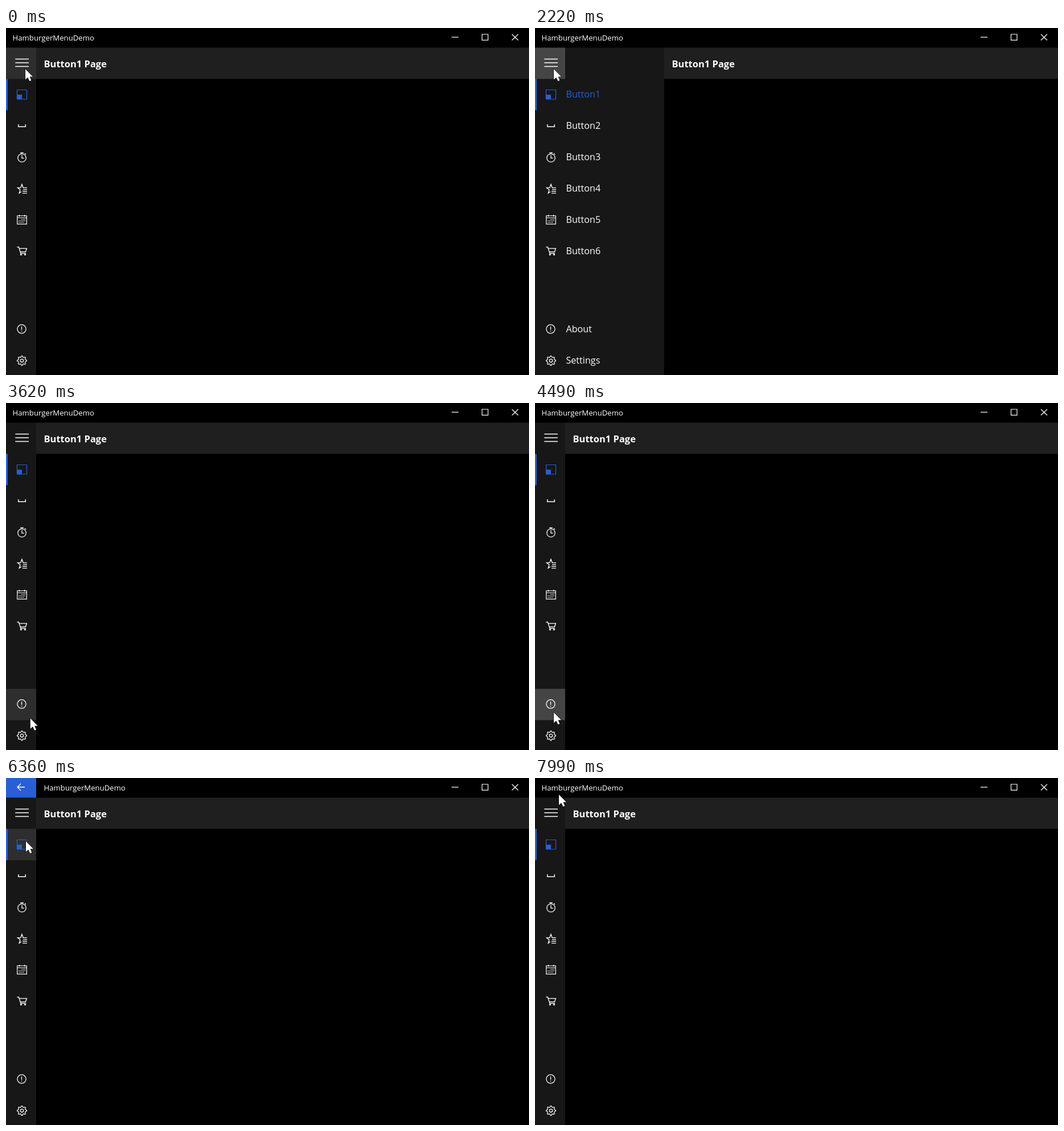
Write an HTML page with a canvas that moves like this. It is 919 by 609 pixels and loops after 8290 ms.

```html
<!DOCTYPE html>
<html lang="en">
<head>
<meta charset="utf-8">
<title>HamburgerMenuDemo</title>
<style>
  html, body { margin: 0; width: 100%; height: 100%; overflow: hidden; background: #000; }
  canvas { position: absolute; left: 0; top: 0; }
  span {
    position: absolute; color: #fff; white-space: pre;
    font: 16.2px/20px "Open Sans", "Noto Sans", sans-serif;
  }
  #title { top: 6.5px; font-size: 13.2px; }
  #head { top: 52.5px; font-size: 16.5px; font-weight: 700; }
</style>
</head>
<body>
<canvas id="stage" width="919" height="609"></canvas>
<span id="title">HamburgerMenuDemo</span>
<span id="head"></span>
<script>
const LOOP = 8290, BLUE = '#295fd3', WHITE = '#fff';
const PANE = 53, WIDE = 227, TOP = 34.5, ROW = 54.95;
const ctx = document.getElementById('stage').getContext('2d');
const title = document.getElementById('title');
const head = document.getElementById('head');

// Pointer moves: start, end, steps, then way points evenly spaced in time.
const home = [34, 72];
const moves = [
  [2220, 2220, 1, [33, 72]],
  [2690, 3470, 11, [35, 150], [39, 308], [48, 440], [44, 547]],
  [3550, 3940, 6, [40, 566], [33, 580]],
  [4260, 4320, 2, [33, 543]],
  [4880, 5580, 10, [50, 430], [74, 290], [68, 150], [46, 89], [36, 111]],
  [5740, 5740, 1, [36, 110]],
  [6060, 6060, 1, [35, 111]],
  [6430, 6750, 6, [43, 62], [51, 26]],
  [6980, 6980, 1, [49, 25]],
  [7295, 7520, 4, [42, 29]]
];
const presses = [[750, 900], [2220, 2370], [4490, 4640], [6210, 6360], [7050, 7220], [7820, 7990]];

const within = (t, a, b) => t >= a && t < b;

function pointer(t) {
  let at = home;
  for (const [start, end, steps, ...way] of moves) {
    if (t < start) break;
    const gap = steps > 1 ? (end - start) / (steps - 1) : 1;
    const done = Math.min(steps, Math.floor((t - start) / gap + 1e-6) + 1);
    const path = [at, ...way];
    const u = done / steps * way.length;
    const i = Math.min(way.length - 1, Math.floor(u));
    at = [0, 1].map(k => path[i][k] + (path[i + 1][k] - path[i][k]) * (u - i));
  }
  return at;
}

function box(x, y, w, h, color) {
  ctx.fillStyle = color;
  ctx.fillRect(x, y, w, h);
}

function line(d, color = WHITE, width = 1.3) {
  ctx.strokeStyle = color;
  ctx.lineWidth = width;
  ctx.stroke(new Path2D(d));
}

function ring(x, y, r, color) {
  ctx.beginPath();
  ctx.arc(x, y, r, 0, Math.PI * 2);
  ctx.strokeStyle = color;
  ctx.lineWidth = 1.3;
  ctx.stroke();
}

const icons = {
  tile(c) {
    line('M19.5 108.5H36.5V125H19.5Z', c, 1.2);
    box(20, 117, 8, 8, c);
  },
  space(c) { line('M21.8 169V173.3H34.3V169', c, 1.4); },
  watch(c) {
    ring(28, 228, 7.2, c);
    line('M25 218.8H31M28 219V221M33 220L35 222M28 223V228.4H31.8', c);
  },
  star(c) {
    line('M36.8 280.3H30.2L28 274.2L25.8 280.3H20.4L25 284L23.2 289.8L27 287.2M30 283.3H37M29 286.5H37M29 289.8H37', c);
  },
  calendar(c) {
    line('M19.8 329.5H36.3V344.2H19.8ZM19.8 333H36.3M23.5 327.8V331M32.7 327.8V331', c, 1.2);
    for (let i = 0; i < 14; i++) {
      const col = i % 5, row = Math.floor(i / 5);
      if (row || col > 1) box(22.4 + col * 2.5, 335 + row * 2.7, 1.3, 1.3, c);
    }
  },
  cart(c) {
    line('M19.5 384.5H22.4L26 395.6H35M23.2 386.8H36.4L34.4 393H25.2', c);
    ring(26.4, 397.6, 1, c);
    ring(33.5, 397.6, 1, c);
  },
  about(c) {
    ring(27.5, 528.3, 7.6, c);
    line('M27.5 524V529.8M27.5 531.3V532.7', c);
  },
  gear(c) {
    const d = [];
    for (let i = 0; i < 32; i++) {
      const a = (i - 0.5) * Math.PI / 16;
      const r = i % 4 < 2 ? 8.3 : 6.3;
      d.push((28 + r * Math.cos(a)).toFixed(2) + ' ' + (583.8 + r * Math.sin(a)).toFixed(2));
    }
    line('M' + d.join('L') + 'Z', c, 1.2);
    ring(28, 583.8, 2.7, c);
  }
};

// Each entry: label, icon, row top.
const items = Object.keys(icons).map((icon, i) => {
  const label = i < 6 ? 'Button' + (i + 1) : i === 6 ? 'About' : 'Settings';
  const top = i < 6 ? 89.3 + i * ROW : 501.6 + (i - 6) * ROW;
  const el = document.createElement('span');
  el.textContent = label;
  el.style.left = '54.4px';
  el.style.top = top + 16.6 + 'px';
  document.body.append(el);
  return { label, icon: icons[icon], top, el };
});

function drawPointer(x, y) {
  const p = new Path2D(`M${x} ${y}v18.6l4.3 -3.9l3 6.6l3.3 -1.4l-3 -6.4h5.7Z`);
  ctx.fillStyle = WHITE;
  ctx.fill(p);
  line(`M${x - .4} ${y - .8}v20.3l4.5 -4l3 6.4l4 -1.8l-2.8 -6.1h5.7Z`, 'rgba(0,0,0,.7)', 0.7);
}

function draw(t) {
  const open = within(t, 900, 2370);
  const about = within(t, 4640, 6360) || within(t, 7220, 7990);
  const back = within(t, 4640, 7990);
  const down = presses.some(([a, b]) => within(t, a, b));
  const [x, y] = pointer(t);
  const pane = open ? WIDE : PANE;
  const over = (top, h) => x < PANE && y >= top && y < top + h;
  const shade = down ? '#454545' : '#2e2e2e';

  box(0, 0, 919, 609, '#000');
  box(0, TOP, pane, 609 - TOP, '#171717');
  box(pane, TOP, 919 - pane, 89.3 - TOP, '#1f1f1f');

  if (back) {
    const color = !over(0, TOP) ? BLUE : down ? '#547fdc' : '#3f6fd7';
    box(0, 0, PANE, TOP, color);
    line('M20 16H33M26 10L20 16L26 22', WHITE, 1.3);
  }
  line('M783 16.2H795M836.5 11H847V21.3H836.5ZM889 11L900 21.5M900 11L889 21.5', WHITE, 1.2);

  if (over(TOP, ROW - .15)) box(0, TOP, PANE, 89.3 - TOP, shade);
  line('M16.3 54.6H40M16.3 61H40M16.3 67.5H40', WHITE, 1.5);

  items.forEach((item, i) => {
    const picked = i === (about ? 6 : 0);
    const color = picked ? BLUE : WHITE;
    if (over(item.top, ROW)) box(0, item.top, pane, ROW, shade);
    if (picked) box(0, item.top, 3, ROW, BLUE);
    item.icon(color);
    item.el.style.color = color;
    item.el.style.display = open ? 'block' : 'none';
  });

  drawPointer(x, y);
  title.style.left = (back ? 66.5 : 11.5) + 'px';
  head.style.left = pane + 13.5 + 'px';
  head.textContent = about ? 'About' : 'Button1 Page';
}

let begin;
function tick(now) {
  begin ??= now;
  draw((now - begin) % LOOP);
  requestAnimationFrame(tick);
}
draw(0);
requestAnimationFrame(tick);
</script>
</body>
</html>
```
